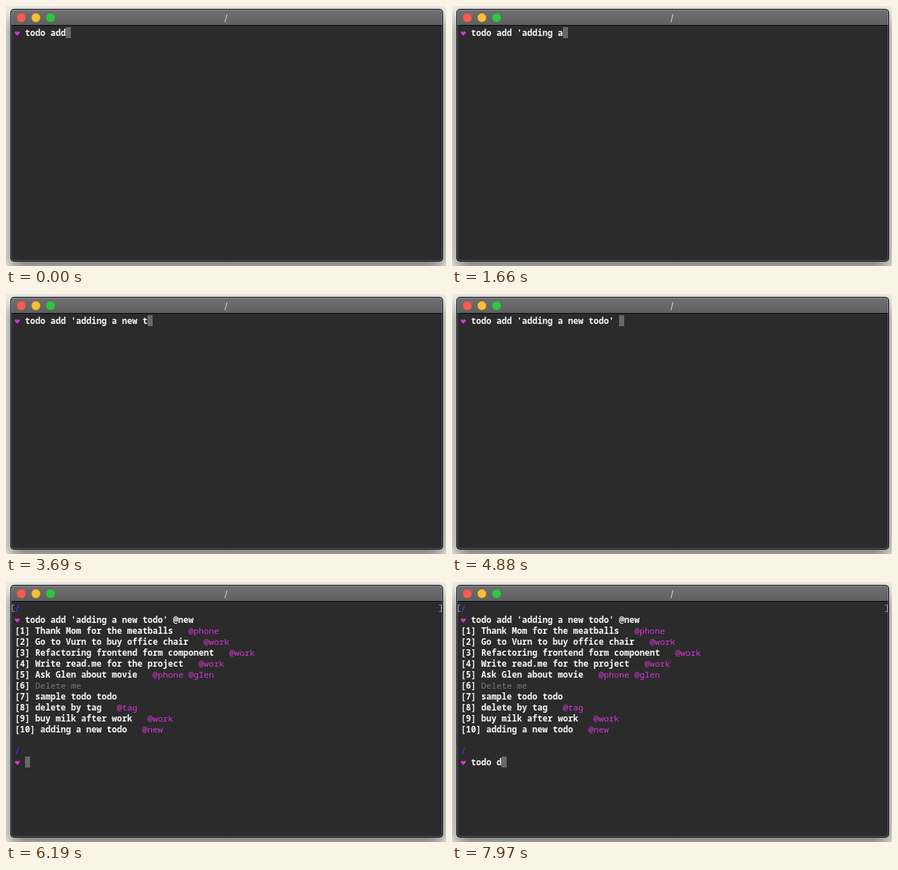
An HTML page with a canvas for the animation above (8000 ms loop, 603 px wide and 356 px high).

```html
<!DOCTYPE html>
<html lang="en">
<head>
<meta charset="utf-8">
<title>Terminal</title>
<style>
html, body { margin: 0; width: 100%; height: 100%; overflow: hidden; background: #f1f2f0; }
canvas { display: block; width: 603px; height: 356px; }
</style>
</head>
<body>
<canvas id="stage"></canvas>
<script>
const W = 603, H = 356, LOOP = 8000;
const LEFT = 12, TOP = 29, CELL = 7, LINE = 15;
const WHITE = '#f8f8f8', PINK = '#d436d4', BLUE = '#4a35e0', GREY = '#7b7b7b';
const MONO = '"Noto Sans Mono", "DejaVu Sans Mono", monospace';
const SANS = 'Inter, "Liberation Sans", sans-serif';

const TITLE_AT = 6070, RUN_AT = 6190;
const COMMAND = "todo add 'adding a new todo' @new";

// Key bursts: first key time, last key time, keys ("|" separates steps)
const ADD_KEYS = [
  [120, 240, " |'"], [600, 600, 'a'], [960, 1310, 'dd|i|n|g'],
  [1550, 1660, ' |a'], [1900, 2250, ' |ne|w| '], [3690, 4040, 't|o|d|o'],
  [4400, 4400, "'"], [4880, 4880, ' '], [5120, 5120, '@'], [5480, 5710, 'n|e|w']
];
const NEXT_KEYS = [[6790, 7260, 't|o|d|o| '], [7970, 7970, 'd']];

const TODOS = [
  ['Thank Mom for the meatballs', '@phone'],
  ['Go to Vurn to buy office chair', '@work'],
  ['Refactoring frontend form component', '@work'],
  ['Write read.me for the project', '@work'],
  ['Ask Glen about movie', '@phone @glen'],
  ['Delete me', '', GREY],
  ['sample todo todo', ''],
  ['delete by tag', '@tag'],
  ['buy milk after work', '@work'],
  ['adding a new todo', '@new']
];

const canvas = document.getElementById('stage');
const ctx = canvas.getContext('2d');
const ratio = window.devicePixelRatio || 1;
canvas.width = Math.round(W * ratio);
canvas.height = Math.round(H * ratio);

function typed(start, bursts, t) {
  let text = start;
  for (const [from, to, keys] of bursts) {
    const steps = keys.split('|');
    const gap = steps.length > 1 ? (to - from) / (steps.length - 1) : 0;
    steps.forEach((key, i) => {
      if (t >= Math.floor((from + gap * i) / 10) * 10) text += key;
    });
  }
  return text;
}

function box(x, y, w, h, r) {
  ctx.beginPath();
  ctx.roundRect(x, y, w, h, r);
}

function write(text, col, row, color = WHITE, weight = 600) {
  ctx.font = `${weight} 11.667px ${MONO}`;
  ctx.fillStyle = color;
  ctx.textAlign = 'left';
  [...text].forEach((ch, i) => {
    ctx.fillText(ch, LEFT + (col + i) * CELL, TOP + row * LINE + 12);
  });
}

function heart(row) {
  const x = LEFT + 3.5, y = TOP + row * LINE + 6;
  ctx.fillStyle = PINK;
  ctx.beginPath();
  ctx.moveTo(x, y + 1.2);
  ctx.bezierCurveTo(x - 1, y - 1, x - 3.4, y - 0.6, x - 3.4, y + 1.3);
  ctx.bezierCurveTo(x - 3.4, y + 3.2, x - 1, y + 3.8, x, y + 6);
  ctx.bezierCurveTo(x + 1, y + 3.8, x + 3.4, y + 3.2, x + 3.4, y + 1.3);
  ctx.bezierCurveTo(x + 3.4, y - 0.6, x + 1, y - 1, x, y + 1.2);
  ctx.fill();
}

function prompt(text, row, cursor) {
  heart(row);
  write(text, 2, row);
  if (!cursor) return;
  ctx.fillStyle = '#686868';
  ctx.fillRect(LEFT + (2 + text.length) * CELL, TOP + row * LINE, CELL, LINE);
}

function promptMarks() {
  ctx.strokeStyle = '#999';
  ctx.lineWidth = 1;
  for (const [x, dir] of [[8.5, 1], [596.5, -1]]) {
    ctx.beginPath();
    ctx.moveTo(x + 3 * dir, 31.5);
    ctx.lineTo(x, 31.5);
    ctx.lineTo(x, 40.5);
    ctx.lineTo(x + 3 * dir, 40.5);
    ctx.stroke();
  }
}

function drawWindow(title) {
  ctx.fillStyle = '#f1f2f0';
  ctx.fillRect(0, 0, W, H);

  ctx.save();
  ctx.shadowColor = 'rgba(0,0,0,.55)';
  ctx.shadowBlur = 22 * ratio;
  ctx.shadowOffsetY = 10 * ratio;
  ctx.fillStyle = '#0c0c0c';
  box(6, 4, 593, 346, 5);
  ctx.fill();
  ctx.restore();

  ctx.save();
  box(7, 5, 591, 344, 4);
  ctx.clip();
  ctx.fillStyle = '#2b2b2b';
  ctx.fillRect(7, 5, 591, 344);
  const bar = ctx.createLinearGradient(0, 5, 0, 26);
  bar.addColorStop(0, '#707070');
  bar.addColorStop(1, '#606060');
  ctx.fillStyle = bar;
  ctx.fillRect(7, 5, 591, 21);
  ctx.fillStyle = '#090909';
  ctx.fillRect(7, 26, 591, 1);
  ctx.restore();

  ctx.strokeStyle = 'rgba(255,255,255,.24)';
  ctx.lineWidth = 1;
  box(7.5, 5.5, 590, 343, 4);
  ctx.stroke();

  ['#ff5a52', '#fdbd2f', '#29c940'].forEach((color, i) => {
    ctx.fillStyle = color;
    ctx.beginPath();
    ctx.arc(21 + 20 * i, 16, 6, 0, Math.PI * 2);
    ctx.fill();
  });

  ctx.font = `400 12.7px ${SANS}`;
  ctx.textAlign = 'center';
  ctx.fillStyle = '#dedede';
  ctx.fillText(title, 301.5, 21);
}

function drawTodos(row) {
  TODOS.forEach(([text, tags, color], i) => {
    const label = `[${i + 1}]`, col = label.length + 1;
    write(label, 0, row + i, WHITE, 800);
    write(text, col, row + i, color, color ? 500 : 600);
    write(tags, col + text.length + 3, row + i, PINK, 500);
  });
}

function draw(t) {
  ctx.setTransform(ratio, 0, 0, ratio, 0, 0);
  const busy = t >= TITLE_AT && t < RUN_AT;
  drawWindow(busy ? ': ' + COMMAND : '/');
  if (t < RUN_AT) {
    prompt(typed('todo add', ADD_KEYS, t), 0, true);
    return;
  }
  promptMarks();
  write('/', 0, 0, BLUE);
  prompt(COMMAND, 1, false);
  drawTodos(2);
  write('/', 0, 13, BLUE);
  prompt(typed('', NEXT_KEYS, t), 14, true);
}

const begin = performance.now();
function tick() {
  draw((performance.now() - begin) % LOOP);
  requestAnimationFrame(tick);
}
tick();
</script>
</body>
</html>
```
